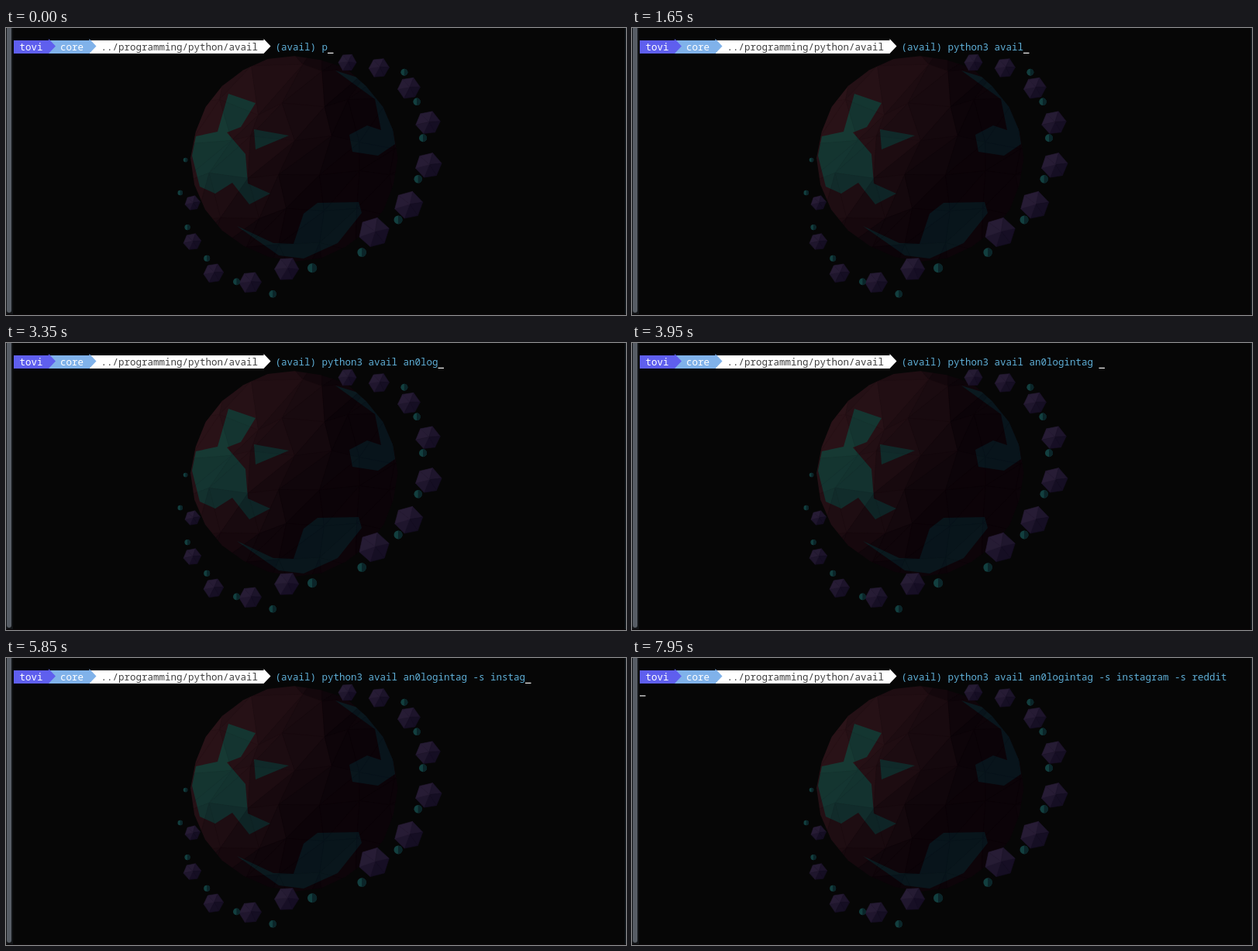
An HTML page for the animation above (8000 ms loop, 800 by 371 pixels).

```html
<!DOCTYPE html>
<html lang="en">
<head>
<meta charset="utf-8">
<title>Terminal session</title>
<style>
  html, body { margin: 0; width: 100%; height: 100%; overflow: hidden; background: #060606; }
  svg { display: block; width: 100%; height: 100%; }
  text { font: 500 12.5px "Noto Sans Mono", monospace; white-space: pre; }
</style>
</head>
<body>
<svg viewBox="0 0 800 371">
  <defs>
    <clipPath id="globe"><polygon id="outline"/></clipPath>
    <clipPath id="land">
      <path d="M240 165L245 140 273 134 287 85 322 97 303 128 285 135 309 163 312 201
        341 214 314 228 292 200 270 214 250 205z"/>
      <path d="M320 131L365 139 322 157z"/>
      <path d="M298 256L345 278 371 279 384 240 402 226 455 225 459 239 428 278 384 298 352 294z"/>
      <path d="M443 138L466 126 484 132 476 92 425 55 470 69 496 110 502 150 480 165 447 160z"/>
    </clipPath>
  </defs>
  <g clip-path="url(#globe)">
    <g id="rocky"></g>
    <g id="green" clip-path="url(#land)"></g>
  </g>
  <g id="belt"></g>
  <rect width="9" height="371" fill="#121417"/>
  <rect x="1" y="-4" width="6" height="372" rx="3" fill="#575d65"/>
  <rect x="798.5" width="1.5" height="371" fill="#10171d"/>
  <rect y="370" width="800" height="1" fill="#0b0709"/>
  <g id="prompt"></g>
  <text id="command" x="347.5" y="28.5" fill="#5fafd7"></text>
  <rect id="cursor" width="7.5" height="1.2" fill="#f4f4f4"/>
</svg>
<script>
const CELL = 7.5, LEFT = 10, LINE = 16.5, LOOP = 8000;
const byId = id => document.getElementById(id);
const column = n => LEFT + n * CELL;
const range = n => Array.from({ length: n }, (_, i) => i);
const noise = n => Math.abs(Math.sin(n * 127.1 + 3.7) * 43758.5453) % 1;
const mix = (from, to, t) => `rgb(${from.map((c, i) => Math.round(c + (to[i] - c) * t))})`;
const facet = (points, fill) =>
  `<polygon points="${points.join(' ')}" fill="${fill}" stroke="${fill}" stroke-width=".6"/>`;

const PLANET = { x: 372, y: 168, r: 131 };
const polar = (angle, distance, { x, y } = PLANET) =>
  [x + distance * Math.cos(angle), y + distance * Math.sin(angle)];
const radians = degrees => degrees * Math.PI / 180;

// Planet: a jittered triangle grid, each facet lit as a piece of the sphere
function sunlight(x, y) {
  const nx = (x - PLANET.x) / PLANET.r, ny = (y - PLANET.y) / PLANET.r;
  const nz = Math.sqrt(Math.max(0, 1 - nx * nx - ny * ny));
  return Math.max(0, -0.8 * nx - 0.4 * ny + 0.3 * nz);
}

function sphereFacets(shade, lit) {
  const size = 46, cells = 7;
  const node = (i, j) => [
    PLANET.x + size * (i - cells / 2 + 0.5 * noise(i * 9 + j) + 0.25 * (j % 2)),
    PLANET.y + size * (j - cells / 2 + 0.5 * noise(i + j * 13) - 0.2),
  ];
  const paint = (points, seed) => {
    const [x, y] = [0, 1].map(axis => points.reduce((sum, p) => sum + p[axis], 0) / 3);
    const light = sunlight(x, y) + 0.14 * (noise(seed) - 0.5);
    return facet(points, mix(shade, lit, Math.min(1, Math.max(0, light))));
  };
  return range(cells * cells).map(n => {
    const i = n % cells, j = Math.floor(n / cells);
    const a = node(i, j), b = node(i + 1, j), c = node(i, j + 1), d = node(i + 1, j + 1);
    return paint([a, b, c], n) + paint([b, d, c], n + 0.5);
  }).join('');
}

byId('outline').setAttribute('points',
  range(24).map(i => polar(radians(i * 15), PLANET.r + noise(i) * 3)).join(' '));
byId('rocky').innerHTML = sphereFacets([11, 3, 8], [44, 20, 25]);
byId('green').innerHTML = sphereFacets([8, 20, 27], [23, 61, 54]);

// Belt: rocks are fans of facets lit from the upper left, moons are half in shadow
function rock(x, y, r, seed) {
  const sides = 6, step = 2 * Math.PI / sides;
  const corner = i => polar(seed + i % sides * step, r * (0.92 + 0.12 * noise(seed + i % sides)), { x, y });
  return range(sides).map(i => {
    const light = 0.5 + 0.5 * Math.cos(seed + (i + 0.5) * step + 2.3);
    return facet([corner(i), corner(i + 1), [x + r * 0.1, y - r * 0.1]], mix([20, 13, 34], [40, 29, 54], light));
  }).join('');
}

const moon = (x, y, r) =>
  `<circle cx="${x}" cy="${y}" r="${r}" fill="#123f3f"/>` +
  `<path d="M${x} ${y - r}a${r} ${r} 0 0 1 0 ${2 * r}z" fill="#0b2529"/>`;

const arc = (count, body, degrees, distance, size) => range(count).map(i =>
  body(...polar(radians(degrees(i)), distance(i)), size(i), i)).join('');

byId('belt').innerHTML =
  arc(7, rock, i => -61 + 13.5 * i + 0.65 * i * i, i => 141 + 37 * Math.sin(i * Math.PI / 6), i => 11.5 + 1.4 * i) +
  arc(5, rock, i => 94 + 15.5 * i, i => 144 + 38 * Math.sin(i * Math.PI / 4), i => 15.5 - 1.4 * i) +
  arc(7, moon, i => -38 + 12 * i + 1.3 * i * i, i => 180 - 6 * i, i => 4.5 + 0.25 * i) +
  arc(6, moon, i => 99 + 16 * i, i => 178 - 1.5 * i * i, i => 4.8 - 0.4 * i);

// Prompt: arrow-shaped segments, each overlapping the next one
const SEGMENTS = [
  { from: 0, to: 6, label: 'tovi', fill: '#5f5fee', ink: '#fff' },
  { from: 6, to: 13, label: 'core', fill: '#80b2ea', ink: '#fff' },
  { from: 13, to: 43, label: '../programming/python/avail', fill: '#fff', ink: '#3f3f3f' },
];
byId('prompt').innerHTML = SEGMENTS.map(({ from, to, label, fill, ink }) => {
  const start = column(from), end = column(to);
  const textX = column(to - 1 - label.length);
  return `<path d="M${start} 16H${end}V14L${end + 9} 23.5L${end} 33H${start}z" fill="${fill}"/>` +
    `<text x="${textX}" y="28.5" fill="${ink}">${label}</text>`;
}).reverse().join('');

// Typing bursts: start time, time per key, keys (\b deletes, \n submits)
const BURSTS = [
  [0, 0, '(avail) p'],
  [140, 120, 'ython3'],
  [1000, 110, ' avail '],
  [2740, 105, 'an0logintag '],
  [4300, 130, '-s '],
  [5090, 150, 'u\b'],
  [5340, 93, 'instagra'],
  [6110, 120, 'm '],
  [6740, 130, '-s'],
  [7030, 95, ' reddit'],
  [7850, 0, '\n'],
];
const KEYS = BURSTS.flatMap(([start, gap, keys]) =>
  [...keys].map((key, i) => ({ key, at: start + i * gap })));

function draw(time) {
  let typed = '', submitted = false;
  for (const { key, at } of KEYS) {
    if (at > time) break;
    if (key === '\b') typed = typed.slice(0, -1);
    else if (key === '\n') submitted = true;
    else typed += key;
  }
  byId('command').textContent = typed;
  byId('cursor').setAttribute('x', submitted ? LEFT : column(45 + typed.length));
  byId('cursor').setAttribute('y', 31.8 + (submitted ? LINE : 0));
}

const began = performance.now();
function tick() {
  draw((performance.now() - began) % LOOP);
  requestAnimationFrame(tick);
}
tick();
</script>
</body>
</html>
```
